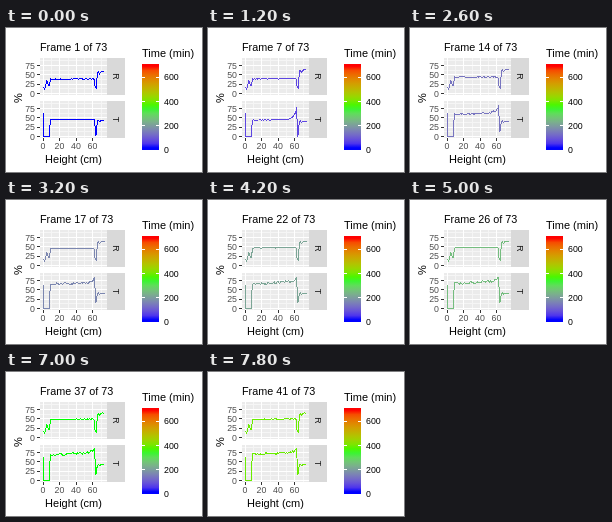
Animation, 196 px wide and 144 px high, one loop 8 s. Source, as an HTML page:

```html
<!DOCTYPE html>
<html lang="en">
<head>
<meta charset="utf-8">
<title>Height profile over time</title>
<style>
  html, body { margin: 0; width: 100%; height: 100%; overflow: hidden; background: #fff; }
  svg { display: block; width: 196px; height: 144px; }
  text { font-family: "Liberation Sans", Arial, sans-serif; font-size: 11px; }
  line, path { shape-rendering: crispEdges; }
  .title { font-size: 10.8px; }
  .small { font-size: 8.8px; }
  .axis { fill: #4d4d4d; }
  .trace { fill: none; stroke-width: 1; stroke-linejoin: round; }
</style>
</head>
<body>
<svg id="stage" viewBox="0 0 196 144"></svg>
<script>
const LOOP = 8000, STEP = 200, COUNT = 73, MAX_TIME = 710;
const stage = document.getElementById('stage');

function add(tag, attrs, content = '', parent = stage) {
  const node = document.createElementNS('http://www.w3.org/2000/svg', tag);
  for (const key in attrs) node.setAttribute(key, attrs[key]);
  node.textContent = content;
  return parent.appendChild(node);
}
// Lines sit on pixel centres so that they stay one pixel wide
const snap = v => Math.floor(v) + 0.5;
const hline = (x1, x2, y, stroke) => add('line', { x1, x2, y1: snap(y), y2: snap(y), stroke });
const vline = (x, y1, y2, stroke) => add('line', { x1: snap(x), x2: snap(x), y1, y2, stroke });
const rect = (x, y, width, height, fill) => add('rect', { x, y, width, height, fill });
const mix = (a, b, t) => a + (b - a) * t;

// Colour ramp blue, green, red, interpolated in CIE Lab
const LAB = [[32.3, 79.2, -107.9], [87.74, -86.18, 83.18], [53.24, 80.09, 67.2]];
function ramp(t) {
  const i = t < 0.5 ? 0 : 1;
  const [l, a, b] = LAB[i].map((v, k) => mix(v, LAB[i + 1][k], t * 2 - i));
  const fy = (l + 16) / 116;
  const [x, y, z] = [fy + a / 500, fy, fy - b / 200].map((f, k) =>
    [0.95047, 1, 1.08883][k] * (f > 6 / 29 ? f ** 3 : (f - 4 / 29) * 108 / 841));
  const rgb = [
    3.2406 * x - 1.5372 * y - 0.4986 * z,
    -0.9689 * x + 1.8758 * y + 0.0415 * z,
    0.0557 * x - 0.204 * y + 1.057 * z
  ].map(c => {
    const g = c <= 0.0031308 ? 12.92 * c : 1.055 * c ** (1 / 2.4) - 0.055;
    return Math.round(255 * Math.min(1, Math.max(0, g)));
  });
  return `rgb(${rgb})`;
}

// Panels
const px = cm => 37.5 + cm * 0.824;
const py = (zero, pct) => zero - pct * 0.373;

function panel(top, name) {
  const zero = top + 35.5;
  rect(34, top, 67, 37, '#ebebeb');
  for (const v of [12.5, 37.5, 62.5, 87.5]) hline(34, 101, py(zero, v), '#f5f5f5');
  for (const v of [10, 30, 50, 70]) vline(px(v), top, top + 37, '#f5f5f5');
  for (const v of [0, 25, 50, 75]) {
    const y = py(zero, v);
    hline(34, 101, y, '#fff');
    hline(31, 34, y, '#333');
    add('text', { x: 29, y: y + 3.2, class: 'small axis', 'text-anchor': 'end' }, v);
  }
  for (const v of [0, 20, 40, 60]) vline(px(v), top, top + 37, '#fff');
  rect(101, top, 18, 37, '#d9d9d9');
  add('text', { transform: `translate(107 ${top + 18.5}) rotate(90)`, class: 'small',
    'text-anchor': 'middle', fill: '#1a1a1a' }, name);
  return { zero, trace: add('path', { class: 'trace' }) };
}
const upper = panel(30, 'R'), lower = panel(73, 'T');

for (const v of [0, 20, 40, 60]) {
  vline(px(v), 110, 113, '#333');
  add('text', { x: px(v) - 0.5, y: 121, class: 'small axis', 'text-anchor': 'middle' }, v);
}
add('text', { x: 67.5, y: 135, 'text-anchor': 'middle' }, 'Height (cm)');
add('text', { transform: 'translate(15.5 70) rotate(-90)', 'text-anchor': 'middle' }, '%');
const title = add('text', { x: 34, y: 23, class: 'title' });

// Legend: a bar of smoothly blended bins
const BAR = 86, BINS = 20;
add('text', { x: 136, y: 29 }, 'Time (min)');
const gradient = add('linearGradient', { id: 'bar', x1: 0, x2: 0, y1: 1, y2: 0 });
for (let i = 0; i < BINS; i++) {
  add('stop', { offset: (i + 0.5) / BINS, 'stop-color': ramp(i / (BINS - 1)) }, '', gradient);
}
rect(136, 36, 17, BAR, 'url(#bar)');
for (const v of [0, 200, 400, 600]) {
  const y = 122 - v / MAX_TIME * BAR;
  hline(136, 139, y, '#fff');
  hline(150, 153, y, '#fff');
  add('text', { x: 158, y: y + 3.1, class: 'small' }, v);
}

// Columns: step, R plateau, R tail, T left, T right, T peak, T dip, T tail, T noise
const LEVELS = [
  [1, 38, 59, 45, 45, 46, 2, 43, 0.6],
  [7, 39, 64, 44, 46, 79, 1, 41, 0.6],
  [11, 42, 65, 54, 60, 82, 10, 41, 4],
  [17, 45, 65, 66, 69, 83, 15, 41, 6],
  [22, 47, 65, 67, 74, 84, 17, 41, 7],
  [30, 48, 66, 69, 75, 85, 17, 42, 7],
  [41, 48.5, 66, 71, 77, 86, 17, 43, 6]
];
function levelsAt(n) {
  const next = LEVELS.findIndex(row => row[0] >= n && row[0] > 1);
  const a = LEVELS[next - 1], b = LEVELS[next];
  return a.map((v, c) => mix(v, b[c], (n - a[0]) / (b[0] - a[0])));
}
const jitter = (x, n) => {
  const s = Math.sin(x * 12.99 + n * 78.23) * 43758.5;
  return s - Math.floor(s) - 0.5;
};
function plot({ zero, trace }, points, color) {
  trace.setAttribute('d', 'M' + points.map(([x, v]) =>
    px(x).toFixed(2) + ' ' + py(zero, v).toFixed(2)).join('L'));
  trace.setAttribute('stroke', color);
}

function draw(n) {
  const [, plateau, tail, left, right, peak, dip, end, noise] = levelsAt(n);
  const color = ramp((n - 1) / (COUNT - 1));
  const r = [[0, 17], [1.2, 11], [2.5, 21], [4, 35], [5, 29], [6.3, 21], [7.3, 23]];
  const t = [[0, 62], [0.4, 0], [7.6, 0], [8, left - 5]];
  for (let x = 8.5; x <= 61; x += 1.25) {
    const u = (x - 8.5) / 52.5;
    r.push([x, plateau + u + jitter(x, n) * 2]);
    t.push([x, mix(left, right, u * u) + jitter(x + 3, n) * noise + (peak - right) * u ** 14 * 0.6]);
  }
  r.push([62, plateau - 4], [62.6, 17], [64, 14], [65.4, tail - 6], [66.5, tail - 1],
    [67.8, tail - 7], [69.5, tail - 2], [71.5, tail], [73, tail - 1], [74, tail]);
  t.push([62.2, peak], [63, dip], [64, dip + 3], [65.2, end - 4], [66.5, end + 1],
    [68, end - 3], [70, end], [72, end - 1], [74, end]);
  plot(upper, r, color);
  plot(lower, t, color);
  title.textContent = `Frame ${n} of ${COUNT}`;
}

// The counter skips one value late in the loop
let shown = -1;
function tick(now) {
  const step = Math.floor(now % LOOP / STEP);
  if (step !== shown) draw(step + (step < 35 ? 1 : 2));
  shown = step;
  requestAnimationFrame(tick);
}
tick(0);
</script>
</body>
</html>
```
